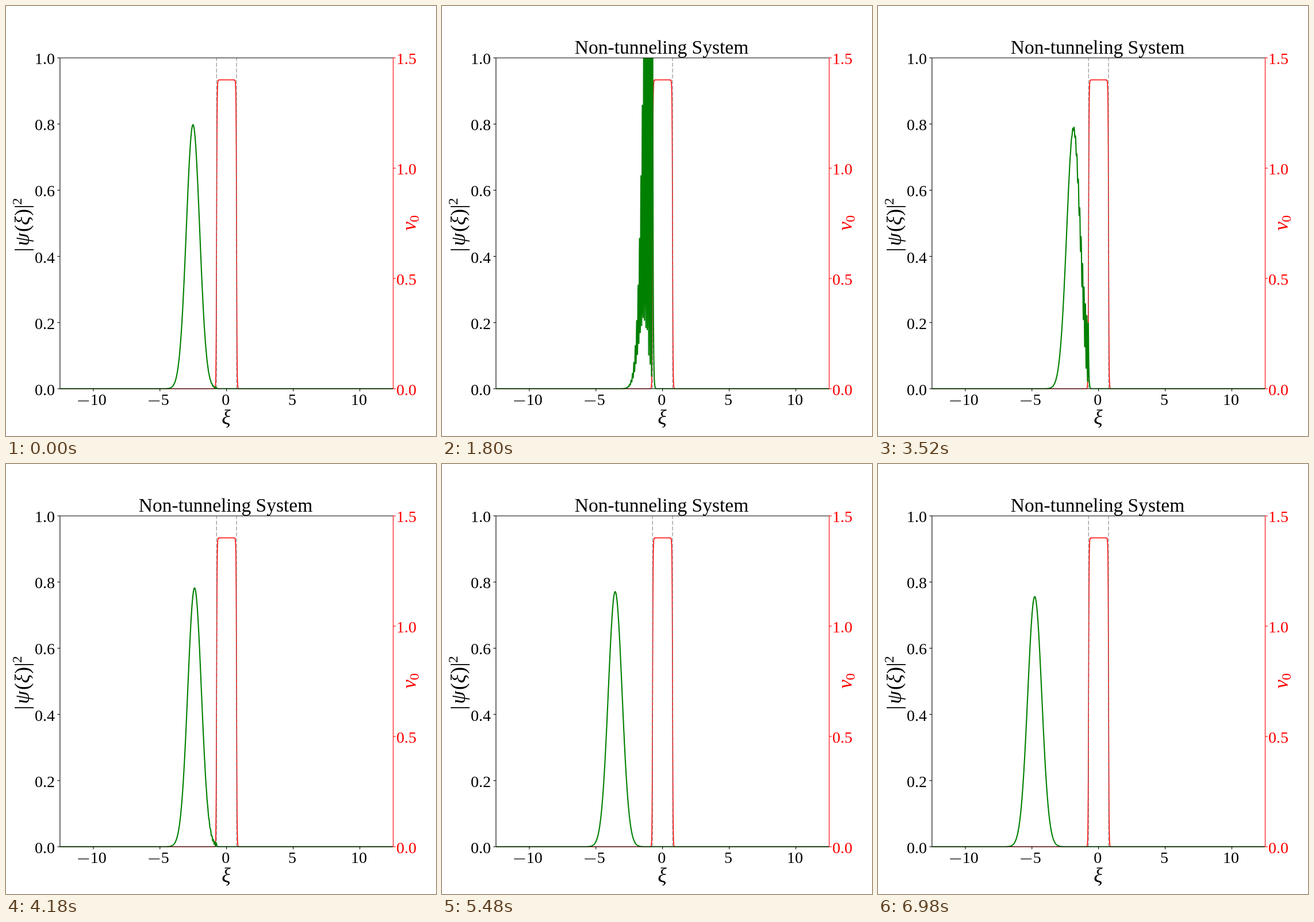
Animation of 748 by 748 pixels, one loop 7000 ms. Source, as an HTML page with a canvas:

```html
<!DOCTYPE html>
<html>
<head>
<meta charset="utf-8">
<style>
  html, body { margin: 0; width: 100%; height: 100%; overflow: hidden; background: #fff; }
  canvas { display: block; }
</style>
</head>
<body>
<canvas id="plot" width="748" height="748"></canvas>
<script>
const ctx = document.getElementById('plot').getContext('2d');
const box = { left: 93.9, right: 673.5, top: 90.2, bottom: 665.8 };
const RED = '#f00', GREEN = '#008000', BLACK = '#000';
const SERIF = '"Liberation Serif", "Noto Serif", serif';

const px = x => box.left + (x + 12.5) / 25 * (box.right - box.left);
const py = v => box.bottom - v * (box.bottom - box.top);

// Packet and barrier parameters, in plot units and steps
const speed = 0.0398, spread = 0.00227, wave = 29.6;
const lastCrest = -0.774, edge = -0.75, decay = 30;

function density(x, n) {
  const widen = 1 + (spread * n) ** 2;
  const peak = Math.sqrt(0.798 / Math.sqrt(widen));
  const packet = c => peak * Math.exp(-((x - c) ** 2) / widen);
  const pos = Math.min(x, edge);
  const incoming = packet(-2.52 + speed * n), reflected = packet(1.14 - speed * n);
  const total = incoming ** 2 + reflected ** 2 +
    2 * incoming * reflected * Math.cos(2 * wave * (pos - lastCrest));
  return x > edge ? insideBarrier(x, n) : total;
}

function insideBarrier(x, n) {
  return density(edge, n) * Math.exp(-decay * (x - edge));
}

function barrier(x) {
  const s = 0.037;
  return 1.4 / 1.5 * (Math.tanh((x + 0.75) / s) - Math.tanh((x - 0.75) / s)) / 2;
}

function curve(f, color, width) {
  ctx.beginPath();
  for (let i = 0; i <= 2500; i++) {
    const x = -12.5 + i / 100;
    ctx.lineTo(px(x), py(Math.min(f(x), 6)));
  }
  ctx.strokeStyle = color;
  ctx.lineWidth = width;
  ctx.stroke();
}

function line(x1, y1, x2, y2, color = BLACK, width = 1.1) {
  ctx.beginPath();
  ctx.moveTo(x1, y1);
  ctx.lineTo(x2, y2);
  ctx.strokeStyle = color;
  ctx.lineWidth = width;
  ctx.stroke();
}

function text(s, x, y, size, align = 'center', color = BLACK, style = '') {
  ctx.font = `${style} ${size}px ${SERIF}`;
  ctx.textAlign = align;
  ctx.fillStyle = color;
  ctx.fillText(s, x, y);
}

// Runs draw with text going upwards from (x, y)
function upward(x, y, draw) {
  ctx.save();
  ctx.translate(x, y);
  ctx.rotate(-Math.PI / 2);
  draw();
  ctx.restore();
}

function axes() {
  const { left, right, top, bottom } = box;
  line(left, top, right, top);
  line(left, bottom, right, bottom);
  line(left, top, left, bottom);
  line(right, top, right, bottom, RED);

  for (let i = 0; i <= 5; i++) {
    const y = py(i / 5);
    line(left - 4.5, y, left, y);
    text((i / 5).toFixed(1), 85, y + 11, 28, 'right');
  }
  for (let i = 0; i <= 3; i++) {
    const y = py(i / 3);
    line(right, y, right + 4.5, y, RED);
    text((i / 2).toFixed(1), 679, y + 11, 28, 'left', RED);
  }
  for (let v = -10; v <= 10; v += 5) {
    const x = px(v), digits = String(Math.abs(v));
    line(x, bottom, x, bottom + 4.5);
    const shift = v < 0 ? 9 : -1.5;
    text(digits, x + shift, 694, 28);
    if (v < 0) {
      const end = x + shift - digits.length * 7 - 2.5;
      line(end - 19, 687, end, 687, BLACK, 1.3);
    }
  }

  text('ξ', 383, 726.5, 36, 'center', BLACK, 'italic');
  upward(40, 428, () => {
    text('|', 4, 0, 36);
    text('ψ', 22, 0, 36, 'center', BLACK, 'italic');
    text('(', 41, 0, 36);
    text('ξ', 54.5, 0, 36, 'center', BLACK, 'italic');
    text(')', 69, 0, 36);
    text('|', 79, 0, 36);
    text('2', 88, -13, 24);
  });
  upward(713, 390, () => {
    text('v', 7, 0, 35, 'center', RED, 'italic');
    text('0', 20, 5, 24, 'center', RED);
  });
}

function render(n) {
  ctx.fillStyle = '#fff';
  ctx.fillRect(0, 0, 748, 748);

  ctx.save();
  ctx.beginPath();
  ctx.rect(box.left, box.top, box.right - box.left, box.bottom - box.top + 0.8);
  ctx.clip();
  ctx.lineJoin = 'round';
  curve(barrier, RED, 1.6);
  ctx.setLineDash([7, 3]);
  for (const x of [-0.75, 0.75]) {
    line(px(x), box.bottom, px(x), box.top, 'rgba(128,128,128,.75)', 1.4);
  }
  ctx.setLineDash([]);
  curve(x => density(x, n), GREEN, 2.1);
  ctx.restore();

  axes();
  if (n > 0) text('Non-tunneling System', 382, 83, 33.5);
}

// Three steps every 140 ms, lasting 20, 100 and 20 ms
function stepAt(ms) {
  const t = ms % 7000, r = t % 140;
  return 3 * Math.floor(t / 140) + (r >= 120 ? 2 : r >= 20 ? 1 : 0);
}

const start = performance.now();
let shown = -1;
function tick() {
  const n = stepAt(performance.now() - start);
  if (n !== shown) render(shown = n);
  requestAnimationFrame(tick);
}
tick();
</script>
</body>
</html>
```
